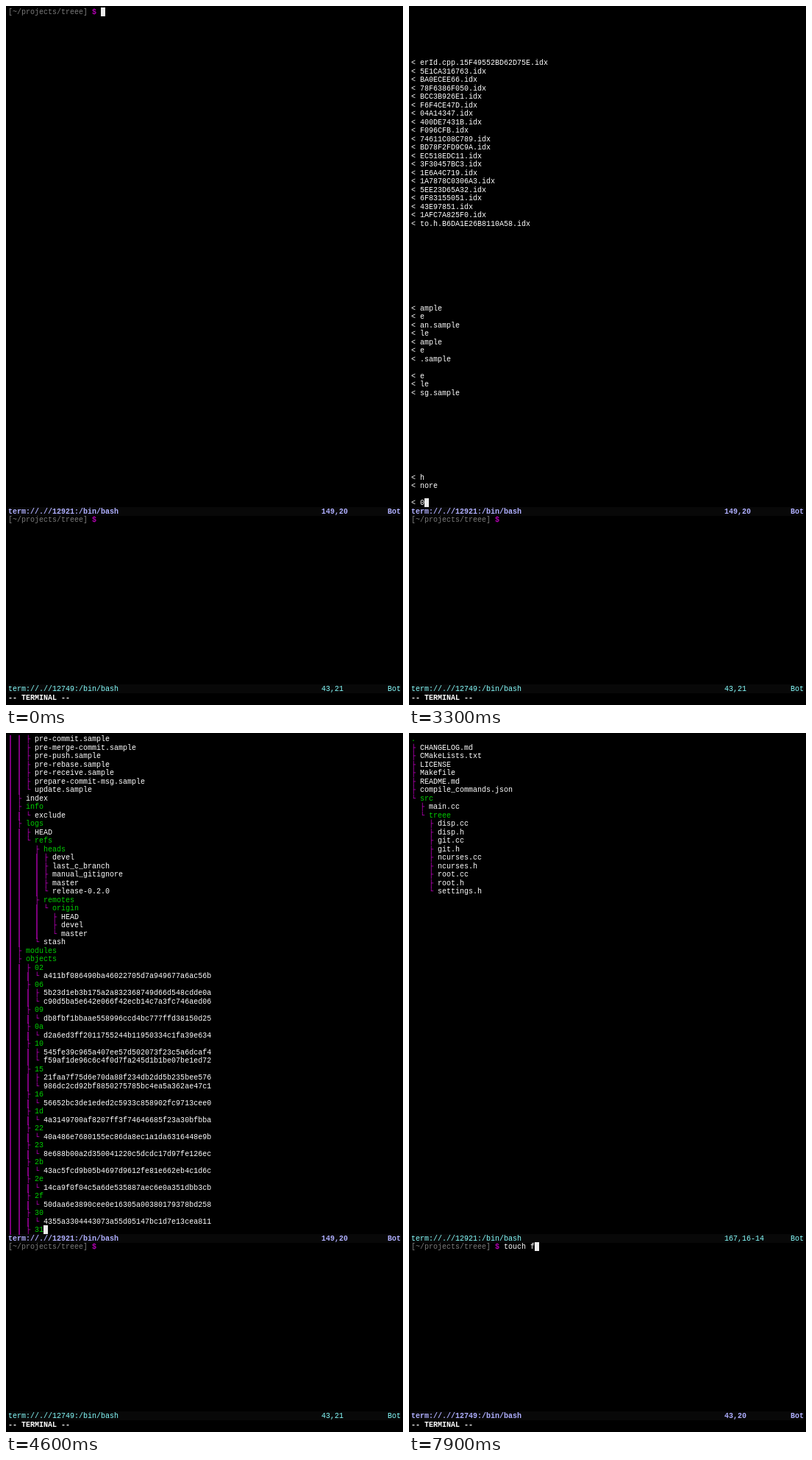
Write an HTML page that moves like this. It is 540 by 950 pixels and loops after 8 s.

```html
<!DOCTYPE html>
<html lang="en">
<head>
<meta charset="utf-8">
<title>treee in a terminal</title>
<style>
html, body { margin: 0; width: 100%; height: 100%; overflow: hidden; background: #000; }
#term { position: relative; width: 540px; height: 950px; overflow: hidden; color: #fff;
  font: 10px/11px "Liberation Mono", "DejaVu Sans Mono", monospace; }
.row, .bar, #cur { position: absolute; white-space: pre; }
.row { left: 3px; height: 11px; }
.bar { left: 3px; width: 534px; height: 12px; background: #080808; }
#cur { width: 6px; height: 12px; line-height: 13px; background: #ececec; color: #000; }
.dir { color: #00cd00; }
.line { color: #c800c8; }
.pipe { color: transparent; padding-bottom: 1px;
  background: linear-gradient(#7c007c, #7c007c) 2px 0 / 2px 100% no-repeat; }
.path { color: #7a7a7a; }
.sign { color: #b400b4; font-weight: bold; }
.on { color: #afafff; font-weight: bold; }
.off { color: #87ffff; }
.bold { font-weight: bold; }
</style>
</head>
<body>
<div id="term"></div>
<script>
const LOOP = 8000, ROWS = 82, VIEW = 59, PITCH = 11.5;

// Object folders: name, then the files inside
const objects = `02 a411bf086490ba46022705d7a949677a6ac56b
06 5b23d1eb3b175a2a832368749d66d548cdde0a c90d5ba5e642e066f42ecb14c7a3fc746aed06
09 db8fbf1bbaae558996ccd4bc777ffd38150d25
0a d2a6ed3ff2011755244b11950334c1fa39e634
10 545fe39c965a407ee57d502073f23c5a6dcaf4 f59af1de96c6c4f0d7fa245d1b1be07be1ed72
15 21faa7f75d6e70da88f234db2dd5b235bee576 986dc2cd92bf8850275785bc4ea5a362ae47c1
16 56652bc3de1eded2c5933c858902fc9713cee0
1d 4a3149700af8207ff3f74646685f23a30bfbba
22 40a486e7680155ec86da8ec1a1da6316448e9b
23 8e688b00a2d350041220c5dcdc17d97fe126ec
2b 43ac5fcd9b05b4697d9612fe81e662eb4c1d6c
2e 14ca9f0f04c5a6de535887aec6e0a351dbb3cb
2f 50daa6e3890cee0e16305a00380179378bd258
30 4355a3304443073a55d05147bc1d7e13cea811
31 b9710e3896a7dfe5b1f29bb3b8709591b8f8f2
34 da0577564b2236d08223321770baceaa0622f7
36 31914e6212ab52a635a339f97b35ef5822a8c5
3a e85be7238a8937fd73b869e361346f67c452d3
3c ccd02a3b60f0671fc69186d61f1bab692931b5`.split('\n');

let seed = 7;
const hexDigit = () => {
  seed = (seed * 1103515245 + 12345) % 2147483648;
  return (seed >> 16 & 15).toString(16);
};
const hash = () => Array.from({ length: 38 }, hexDigit).join('');
for (const d of '41 43 4a 4f 55 5b 60 68 6c 73 79 80 8e'.split(' ')) objects.push(d + ' ' + hash());

const objectLines = objects.map(o => {
  const [dir, ...files] = o.split(' ');
  return [`  ${dir}/`, ...files.map(f => '   ' + f)].join('\n');
}).join('\n');

// One leading space per level; folders end in a slash
const spec = `.assets/
 demo.gif
.cache/
 clangd/
  index/
   CMakeCXXCompilerId.cpp.15F49552BD62D75E.idx
   config.h.0E43A5E1CA316763.idx
   disp.h.819B980BA0ECEE66.idx
   files.cc.B51BB78F6386F050.idx
   files.h.B787C3BCC3B926E1.idx
   git.cc.FFD4152F6F4CE47D.idx
   git.h.EA39DAB704A14347.idx
   main.cc.EAF4A3400DE7431B.idx
   mv.h.A9E15E6BDF096CFB.idx
   ncurses.h.636774611C08C789.idx
   nocvref.h.0577BD78F2FD9C9A.idx
   noref.h.9440DBEC518EDC11.idx
   root.cc.A7AF163F30457BC3.idx
   root.h.88B3CDD1E6A4C719.idx
   settings.h.4161A7878C0306A3.idx
   state.cc.247DD5EE23D65A32.idx
   state.h.CDF4C56F83155051.idx
   str.h.2EAE110D43E97851.idx
   str_lt.h.0C2AA1AFC7A825F0.idx
   subscriptable_to.h.B6DA1E26B8110A58.idx
.clang-format
.git/
 COMMIT_EDITMSG
 HEAD
 ORIG_HEAD
 branches/
 config
 description
 hooks/
  applypatch-msg.sample
  commit-msg.sample
  fsmonitor-watchman.sample
  post-update.sample
  pre-applypatch.sample
  pre-commit.sample
  pre-merge-commit.sample
  pre-push.sample
  pre-rebase.sample
  pre-receive.sample
  prepare-commit-msg.sample
  update.sample
 index
 info/
  exclude
 logs/
  HEAD
  refs/
   heads/
    devel
    last_c_branch
    manual_gitignore
    master
    release-0.2.0
   remotes/
    origin/
     HEAD
     devel
     master
   stash
 modules/
 objects/
${objectLines}
 refs/
.gitignore
CHANGELOG.md
CMakeLists.txt
LICENSE
Makefile
README.md
build/
 CMakeCache.txt
 CMakeFiles/
  3.17.4/
   CMakeCXXCompiler.cmake
   CMakeDetermineCompilerABI_CXX.bin
   CMakeSystem.cmake
   CompilerIdCXX/
    CMakeCXXCompilerId.cpp
    a.out
    tmp/
  CMakeDirectoryInformation.cmake
  CMakeOutput.log
  CMakeTmp/
  Makefile.cmake
  Makefile2
  TargetDirectories.txt
  VerifyGlobs.cmake
  cmake.check_cache
  cmake.verify_globs
  progress.marks
  treee.dir/
   CXX.includecache
   DependInfo.cmake
   build.make
   cmake_clean.cmake
   depend.internal
   depend.make
   flags.make
   link.txt
   progress.make
   src/
    main.cc.o
    treee/
     disp.cc.o
     git.cc.o
     ncurses.cc.o
     root.cc.o
 Makefile
 cmake_install.cmake
 treee
compile_commands.json
src/
 main.cc
 treee/
  disp.cc
  disp.h
  git.cc
  git.h
  ncurses.cc
  ncurses.h
  root.cc
  root.h
  settings.h`;

const root = { kids: [] }, path = [root];
for (const text of spec.split('\n')) {
  const depth = text.search(/\S/), dir = text.endsWith('/');
  const node = { name: text.trim().replace('/', ''), dir, kids: [] };
  path[depth].kids.push(node);
  path[depth + 1] = node;
}

function list(kids, pre = '') {
  return kids.flatMap((n, i) => {
    const last = i === kids.length - 1;
    return [{ pre: pre + (last ? '└ ' : '├ '), name: n.name, dir: n.dir },
      ...list(n.kids, pre + (last ? '  ' : '│ '))];
  });
}
function tree(hidden, ignored) {
  const kids = root.kids.filter(n => (hidden || n.name[0] !== '.') &&
    (ignored || !['.cache', 'build'].includes(n.name)));
  return [{ pre: '', name: '.', dir: true }, ...list(kids)];
}
const plain = tree(false, false), dotted = tree(true, false),
  all = tree(true, true), built = tree(false, true);

// Time table of screen states
const steps = [];
const add = (t, state) => steps.push({ t, ...state });
const run = (t, values, make) => values.forEach((v, i) => add(t + i * 100, make(v)));
add(0, { cmd: '' });
add(500, { cmd: 't' });
add(700, { cmd: 'tre' });
run(900, ['tree', 'treee'], cmd => ({ cmd }));
add(1100, { rows: plain });
add(1700, { rows: dotted });
add(2400, { rows: all });
run(3000, [10, 20, 30, 20, 10, 0], x => ({ rows: all, x }));
run(3700, [10, 20, 30, 40, 50, 70], y => ({ rows: all, y }));
run(4400, [60, 50, 40, 30, 20, 0], y => ({ rows: all, y }));
add(5700, { rows: built });
add(6300, { rows: plain });
add(7100, { rows: plain, low: '', normal: true });
add(7300, { rows: plain, low: '' });
run(7500, ['t', 'to', 'touc', 'touch ', 'touch f'], low => ({ rows: plain, low }));

const term = document.getElementById('term');
const rowY = r => Math.round(r * PITCH);
function box(cls, y) {
  const el = document.createElement('div');
  el.className = cls;
  el.style.top = y + 'px';
  return term.appendChild(el);
}
for (const r of [59, 80]) box('bar', rowY(r) + 2);
const cur = box('', 0);
cur.id = 'cur';
const lines = Array.from({ length: ROWS }, (_, r) => box('row', rowY(r) + 3));

const span = (cls, text) => `<span class="${cls}">${text}</span>`;
const prompt = cmd => span('path', '[~/projects/treee]') + ' ' + span('sign', '$') + ' ' + cmd;
const status = (id, pos, on) => span(on ? 'on' : 'off',
  `term://.//${id}:/bin/bash`.padEnd(71) + pos.padEnd(15) + 'Bot');
const branch = pre => span('line', pre.replace(/│/g, span('pipe', '│')));

function entry(e, x) {
  const kind = e.dir ? 'dir' : '', len = e.pre.length + e.name.length;
  if (!x) return [branch(e.pre) + span(kind, e.name), len];
  const cut = x + 2;
  if (len <= cut) return ['', 0];
  const html = '&lt; ' + branch(e.pre.slice(cut)) +
    span(kind, e.name.slice(Math.max(0, cut - e.pre.length)));
  return [html, len - x];
}

function moveCursor(row, col, text = '') {
  cur.style.left = 3 + col * 6 + 'px';
  cur.style.top = rowY(row) + 2 + 'px';
  cur.textContent = text;
  cur.style.zIndex = text ? 1 : 0;
}

function draw({ cmd, rows, x = 0, y = 0, low, normal }) {
  const out = Array(ROWS).fill('');
  const below = low !== undefined;
  if (rows) {
    rows.slice(y, y + VIEW).forEach((e, r) => {
      const [html, end] = entry(e, x);
      out[r] = html;
      moveCursor(r, end);
    });
  } else {
    out[0] = prompt(cmd);
    moveCursor(0, 21 + cmd.length);
  }
  out[59] = status(12921, below ? '167,16-14' : '149,20', !below);
  out[60] = prompt(low || '');
  out[80] = status(12749, below ? '43,20' : '43,21', below);
  if (!normal) out[81] = span('bold', '-- TERMINAL --');
  if (normal) moveCursor(60, 19, '$');
  else if (below) moveCursor(60, 21 + low.length);
  out.forEach((html, r) => { lines[r].innerHTML = html; });
}

let shown;
const start = performance.now();
function tick() {
  const t = (performance.now() - start) % LOOP;
  const step = steps.filter(s => s.t <= t).pop();
  if (step !== shown) draw(shown = step);
  requestAnimationFrame(tick);
}
tick();
</script>
</body>
</html>
```
